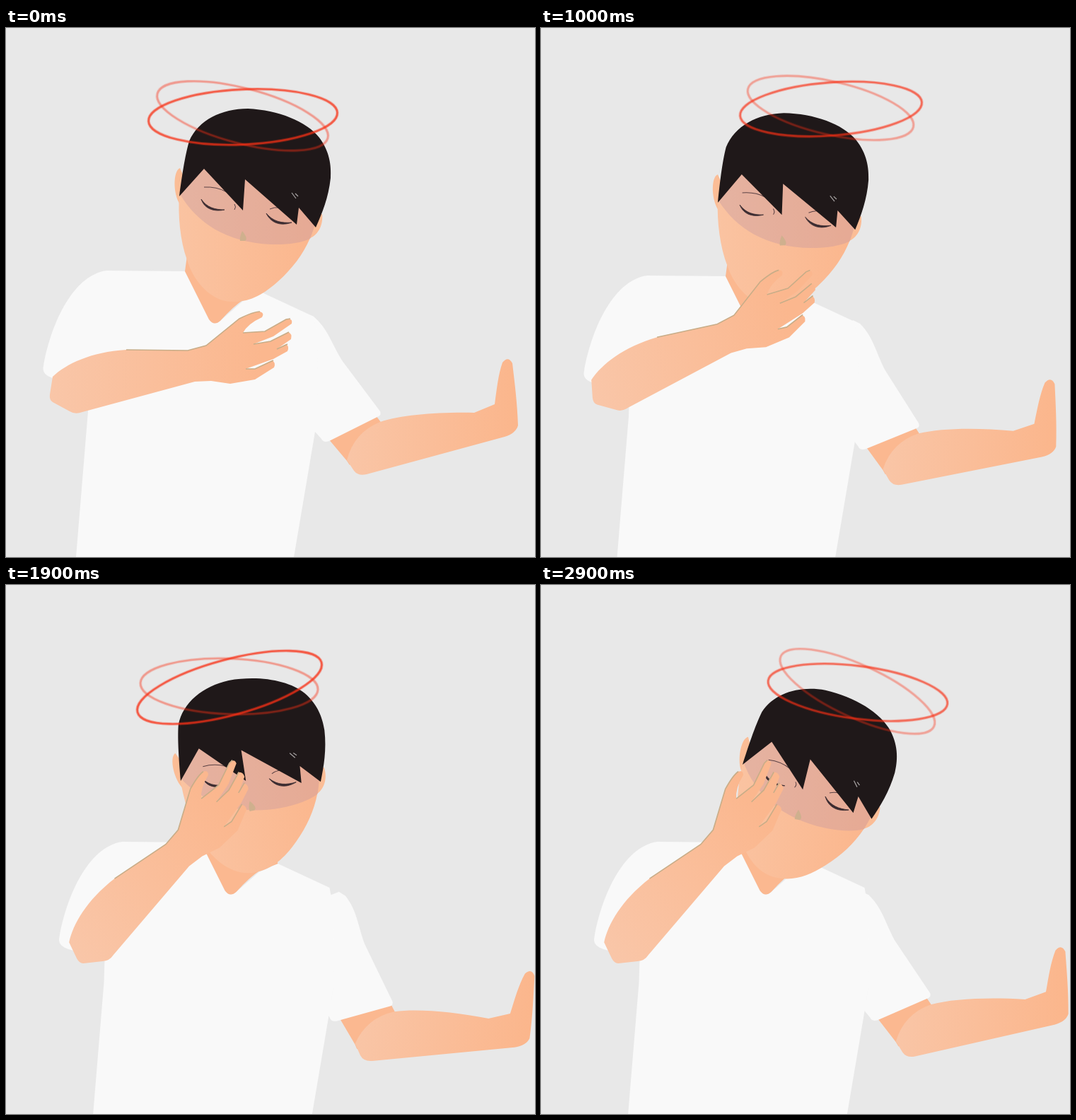
These frames come from a looping animation (748x748 px, 3000 ms). An HTML page with a canvas:

```html
<!DOCTYPE html>
<html lang="en">
<head>
<meta charset="utf-8">
<title>Dizzy spell</title>
<style>
  html, body { margin: 0; width: 100%; height: 100%; overflow: hidden; background: #e8e8e8; }
  canvas { display: block; }
</style>
</head>
<body>
<canvas id="stage" width="748" height="748"></canvas>
<script>
const ctx = document.getElementById('stage').getContext('2d');
const LOOP = 3000, STEP = 100;
const RAD = Math.PI / 180;
const TIMES = [0, 500, 1000, 1400, 1900, 2400, 2900];

// Poses at TIMES: x, y of the anchor, rotation in degrees
const POSES = {
  body: [[0, 0, 0], [0, 0, 0], [8, 7, 0], [16.5, 15, 0], [22.5, 20, 0], [22.5, 20, 0], [22.5, 20, 0]],
  head: [[245, 238, 0], [245, 238, 0], [250, 247, -1.7], [250, 262, -6.4], [247, 277, -12.5], [263, 261, -2], [285, 254, 10]],
  sleeve: [[529, 545, 0], [529, 545, 0], [534, 562, 4.5], [540, 580, 9], [546, 592, 11], [549, 582, 5], [550, 580, 3]],
  outerArm: [[498, 631, 0], [498, 631, 0], [498, 645, 4], [500, 661, 9.1], [506, 671, 9.7], [515, 668, 4], [517, 666, 2.4]],
  innerArm: [[98, 545, 0], [98, 545, 0], [114, 541, -12.9], [131, 539, -22.5], [145, 530, -34.4], [145, 530, -34.4], [145, 530, -34.4]],
  orbit: [[380, 125, 0], [377, 129, 0], [367, 121, 0], [363, 140, 0], [360, 140, 0], [403, 143, 0], [408, 162, 0]]
};

const SHAPES = {
  torso: `M142 343 L253 344 L287 412 Q294 422 303 414 L335 386 L362 374 L435 408 L441 440 L440 550
    L437 571 L405 760 L98 760 L116 542 L117 510 L66 495 Q50 490 53 478 C62 425 92 350 142 343Z`,
  sleeve: `M400 420 L425 404 L435 408 C455 425 460 445 475 470 L529 542 Q531 547 527 549
    L457 584 Q449 587 446 581 L437 571Z`,
  neck: 'M256 322 L253 344 L287 412 Q294 422 303 414 Q322 393 336 384 L362 374 L340 320Z',
  upperArm: 'M450 574 L520 544 L532 560 L486 618 L482 612Z',
  foreArm: `M482 611 Q492 572 529 557 C560 547 610 543 662 544 L691 532 C694 510 696 490 702 473
    Q710 463 716 474 C719 500 723 530 724 562 Q721 573 705 578 L510 631 Q498 634 492 626Z`,
  innerArm: `M66 493 C85 475 120 458 170 455 L257 456 L283 449 L330 411 Q350 401 359 401
    Q366 403 362 409 Q342 418 335 431 L366 429 L396 412 Q406 410 404 418 L378 436 L350 447
    L374 443 L399 430 Q405 432 403 440 L383 454 L396 447 Q401 450 398 457 L378 468 L339 482
    L352 482 L376 470 Q382 473 379 480 L352 497 L317 503 L290 499 L267 500 L108 543
    Q98 547 90 542 L66 529 Q61 526 62 518Z`,
  armEdges: `M170 455 L257 456 L283 449 L330 411 Q350 401 359 401 M335 431 L366 429 L396 412
    L402 411 M350 447 L374 443 L400 430 M383 454 L398 447 M339 482 L352 482 L378 470`,
  face: `M245 235 C243 265 246 300 256 328 C265 358 290 387 320 387 C345 388 365 376 385 358
    C405 340 420 320 430 297 L440 270 L400 200 L270 190Z`,
  ears: `M246 198 C236 202 236 235 246 249 L262 235Z
    M447 263 C449 280 440 294 428 298 L425 270Z`,
  shade: 'M246 235 C270 275 310 303 375 306 Q410 307 430 298 L440 270 L400 200 L270 190Z',
  hair: `M245 238 C248 215 253 180 259 160 C272 130 305 114 342 114 C385 116 425 132 443 155
    C458 175 460 195 459 212 C456 240 447 262 438 282 L414 254 L411 278 L338 214 L335 258 L280 199Z`,
  eyes: `M276 242 C281 257 296 260 309 257 C296 257 284 254 276 242Z
    M368 262 C375 277 390 280 404 275 C390 276 378 274 368 262Z`,
  brows: 'M280 225 Q298 224 312 232 M323 249 Q326 253 323 257 M373 256 Q380 253 386 254',
  nose: 'M334 287 Q343 298 338 301 L331 301 Q330 296 334 287Z',
  shine: 'M404 233 L410 241 M409 234 L413 238'
};
for (const name in SHAPES) SHAPES[name] = new Path2D(SHAPES[name]);

function skin(x0, x1, from = '#f9c5a6', to = '#fbb68c') {
  const g = ctx.createLinearGradient(x0, 0, x1, 0);
  g.addColorStop(0, from);
  g.addColorStop(1, to);
  return g;
}
const SKIN = {
  face: skin(245, 425, '#fac3a1', '#fbb78e'),
  foreArm: skin(485, 720),
  innerArm: skin(62, 360, '#f9c6a8', '#fbb78e'),
  dark: '#fbb890'
};

// Slope at key i; zero where the value holds or turns
function slope(v, i) {
  if (i === 0 || i === v.length - 1) {
    const a = i ? i - 1 : 0;
    return (v[a + 1] - v[a]) / (TIMES[a + 1] - TIMES[a]);
  }
  const l = (v[i] - v[i - 1]) / (TIMES[i] - TIMES[i - 1]);
  const r = (v[i + 1] - v[i]) / (TIMES[i + 1] - TIMES[i]);
  return l * r > 0 ? 2 * l * r / (l + r) : 0;
}

function glide(v, t) {
  let i = 0;
  while (i < TIMES.length - 2 && t > TIMES[i + 1]) i++;
  const d = TIMES[i + 1] - TIMES[i], u = (t - TIMES[i]) / d, w = 1 - u;
  return v[i] * w * w * (1 + 2 * u) + v[i + 1] * u * u * (3 - 2 * u)
    + d * u * w * (slope(v, i) * w - slope(v, i + 1) * u);
}

const poseAt = (name, t) => [0, 1, 2].map(k => glide(POSES[name].map(p => p[k]), t));

function posed(name, t, draw) {
  const [x, y, angle] = poseAt(name, t);
  const [px, py] = POSES[name][0];
  ctx.save();
  ctx.translate(x, y);
  ctx.rotate(angle * RAD);
  ctx.translate(-px, -py);
  draw();
  ctx.restore();
}

function fill(name, style) {
  ctx.fillStyle = style;
  ctx.fill(SHAPES[name]);
}

function stroke(name, style, width) {
  ctx.strokeStyle = style;
  ctx.lineWidth = width;
  ctx.stroke(SHAPES[name]);
}

function drawHead() {
  fill('ears', '#fbbd96');
  fill('face', SKIN.face);
  fill('shade', 'rgba(190,146,161,.35)');
  fill('nose', '#cfb08e');
  stroke('brows', '#5a4144', 1);
  fill('eyes', '#3b2c31');
  stroke('eyes', '#3b2c31', 0.8);
  fill('hair', '#1f1819');
  stroke('shine', '#a9a5a5', 1.2);
}

function ring(x, y, rx, ry, tilt, alpha, width) {
  ctx.beginPath();
  ctx.ellipse(x, y, rx, ry, tilt * RAD, 0, 2 * Math.PI);
  // A wide faint pass below the line gives it a soft edge
  for (const [w, a] of [[width + 2, alpha * 0.3], [width, alpha * 0.8]]) {
    ctx.strokeStyle = `rgba(248,48,22,${a})`;
    ctx.lineWidth = w;
    ctx.stroke();
  }
}

function drawRings(t) {
  const turn = (178 - 0.195 * t) * RAD;
  const near = Math.sin(turn - 12 * RAD);
  const size = 1 + 0.05 * near;
  const [cx, cy] = poseAt('orbit', t);
  const tilt = poseAt('head', t)[2];
  const x = cx + 45 * Math.cos(turn), y = cy + 22 * Math.sin(turn);
  ring(x - 0.5, y - 1.5, 123 * size, 38.5 * size, tilt + 14.6, 0.4 + 0.05 * near, 2.6);
  ring(x, y, 132 * size, 38.5 * size, tilt - 2.6, 0.8 + 0.14 * near, 2.6);
}

function draw(t) {
  ctx.fillStyle = '#e8e8e8';
  ctx.fillRect(0, 0, 748, 748);
  posed('outerArm', t, () => {
    fill('upperArm', SKIN.dark);
    fill('foreArm', SKIN.foreArm);
  });
  posed('sleeve', t, () => fill('sleeve', '#f9f9f9'));
  posed('body', t, () => {
    fill('torso', '#f9f9f9');
    fill('neck', SKIN.dark);
  });
  posed('head', t, drawHead);
  drawRings(t);
  posed('innerArm', t, () => {
    fill('innerArm', SKIN.innerArm);
    stroke('armEdges', '#c8ad88', 1.6);
  });
}

function tick() {
  const t = performance.now() % LOOP;
  draw(Math.floor(t / STEP) * STEP);
  requestAnimationFrame(tick);
}
tick();
</script>
</body>
</html>
```
